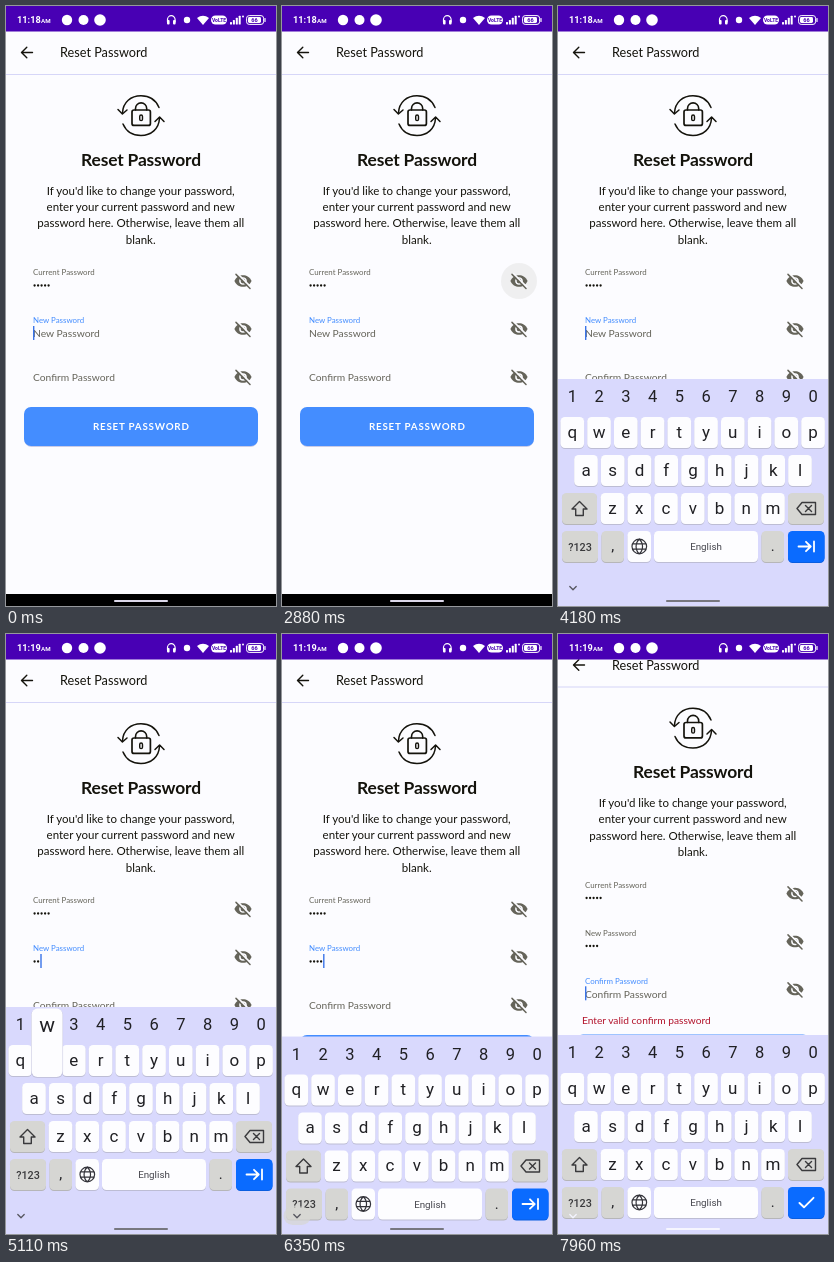
These frames come from a looping animation (270 px wide and 600 px high, 7.99 s). An HTML page:

```html
<!DOCTYPE html>
<html lang="en">
<head>
<meta charset="utf-8">
<title>Reset password</title>
<style>
html, body { margin: 0; width: 100%; height: 100%; overflow: hidden; background: #fcfcff; }
svg { display: block; width: 270px; height: 600px; font-family: Lato, sans-serif; }
.ui { font-family: Roboto, sans-serif; }
.mid { text-anchor: middle; }
.line { fill: none; stroke-linecap: round; stroke-linejoin: round; }
</style>
</head>
<body>
<svg id="stage" viewBox="0 0 270 600" xmlns="http://www.w3.org/2000/svg"></svg>
<script>
const LOOP = 7990, INK = '#14130c', GREY = '#65645a', BLUE = '#448dff', SOFT = '#d6d6d3';
const PAGE = '#fcfcff', BOARD = '#d9d9fd';
const stage = document.getElementById('stage');

function add(parent, tag, attrs, text) {
  const el = document.createElementNS('http://www.w3.org/2000/svg', tag);
  for (const k in attrs) el.setAttribute(k, attrs[k]);
  if (text != null) el.textContent = text;
  parent.appendChild(el);
  return el;
}
const group = (p, attrs = {}) => add(p, 'g', attrs);
const rect = (p, x, y, width, height, fill, rx = 0) => add(p, 'rect', { x, y, width, height, fill, rx });
const circle = (p, cx, cy, r, fill) => add(p, 'circle', { cx, cy, r, fill });
const label = (p, x, y, size, fill, text, more = {}) =>
  add(p, 'text', { x, y, 'font-size': size, fill, ...more }, text);
const stroke = (p, d, color, width = 1.3) =>
  add(p, 'path', { d, class: 'line', stroke: color, 'stroke-width': width });
const show = (el, on) => el.setAttribute('opacity', +on);
const move = (el, y) => el.setAttribute('transform', `translate(0 ${y.toFixed(2)})`);
const MID = { class: 'mid' };

// Page
rect(stage, 0, 0, 270, 600, PAGE);
const page = group(stage);
rect(page, 0, 68, 270, 1, '#d6d6f8');
stroke(page, 'M26.5 46.5H15.8M20.8 41.3L15.5 46.5L20.8 51.7', INK, 1.4);
label(page, 54, 51, 12.7, INK, 'Reset Password');

stroke(page, 'M116.5 107C117 96 125 89.8 135 89.8C143.5 89.8 150 94.5 153 101.5', INK, 1.5);
stroke(page, 'M153.5 112C153 123 145 129.5 135 129.5C126.5 129.5 120 125 117 118', INK, 1.5);
stroke(page, 'M112 103.5L116.4 108L121 104M149 115.5L153.6 111L158 115.5', INK, 1.5);
stroke(page, 'M129.5 104V102.5A5.6 5.6 0 0 1 140.7 102.5V104', INK, 1.6);
add(page, 'rect', { x: 126, y: 104, width: 18.4, height: 15.4, rx: 2, fill: 'none', stroke: INK, 'stroke-width': 1.7 });
add(page, 'rect', { x: 133.7, y: 109, width: 2.8, height: 5.6, rx: 1.4, fill: 'none', stroke: INK, 'stroke-width': 1.4 });

label(page, 135, 159.5, 17.4, INK, 'Reset Password', { class: 'mid', 'font-weight': 700, 'letter-spacing': -0.15 });
["If you'd like to change your password,", 'enter your current password and new',
 'password here. Otherwise, leave them all', 'blank.'
].forEach((s, i) => label(page, 134.7, 188.5 + 16.4 * i, 11.5, INK, s, MID));

const ripple = circle(page, 237, 275, 18, SOFT);
function eye(y, bg) {
  const g = group(page, { transform: `translate(237 ${y}) scale(.78)` });
  add(g, 'path', { d: 'M-11 0C-7-10 7-10 11 0C7 10-7 10-11 0Z', fill: GREY });
  circle(g, 0, 0, 4.9, bg);
  circle(g, 0, 0, 3, GREY);
  const slash = group(g);
  stroke(slash, 'M-7.5-9.8L10.5 8.2', PAGE, 2.4).style.strokeLinecap = 'butt';
  stroke(slash, 'M-9-8.5L9 9.5', GREY, 1.9);
  return slash;
}
const slash = eye(275, 'none');
eye(323, PAGE);
eye(371, PAGE);
const iris = add(slash.parentNode, 'circle', { r: 4, fill: 'none', stroke: PAGE, 'stroke-width': 1.9 });
slash.parentNode.appendChild(slash);

function dots(y, n) {
  const list = [];
  for (let i = 0; i < n; i++) list.push(circle(page, 28.6 + 3.5 * i, y, 1.15, INK));
  return list;
}
label(page, 27, 269.3, 7.9, GREY, 'Current Password');
const oldDots = dots(279.5, 5);
const plain = label(page, 27, 283.3, 9.8, '#4a483c', '12345');

const newLabel = label(page, 27, 317.2, 7.9, BLUE, 'New Password');
const newHint = label(page, 27, 331, 10.3, GREY, 'New Password');
const newDots = dots(327.5, 4);

const okLabel = label(page, 27, 365, 7.9, BLUE, 'Confirm Password');
const okHint = label(page, 27, 374.8, 10.25, GREY, 'Confirm Password');
const cursor = rect(page, 27, 320, 1.4, 14, '#3a74e8');

const error = label(page, 24, 405.8, 10.2, '#b3142c', 'Enter valid confirm password');
const button = group(page);
rect(button, 18.5, 402.5, 233, 38.6, '#c9cbe6', 7);
rect(button, 18, 401, 234, 39, BLUE, 7);
const clip = add(add(stage, 'defs'), 'clipPath', { id: 'btn' });
rect(clip, 18, 401, 234, 39, '#000', 7);
const splash = add(button, 'circle', { cx: 135, cy: 420, r: 10, fill: '#fff', 'clip-path': 'url(#btn)' });
label(button, 135.3, 424, 9.8, '#fff', 'RESET PASSWORD', { class: 'mid', 'font-weight': 700, 'letter-spacing': 0.78 });

// Status bar
const bar = group(stage, { class: 'ui' });
rect(bar, 0, 0, 270, 25.5, '#4800b4');
const clock = label(bar, 11, 17.4, 9.2, '#fff', '11:18', { 'font-weight': 700 });
label(bar, 35, 17.4, 6.2, '#fff', 'AM', { 'font-weight': 700 });
circle(bar, 61, 14, 5.2, '#fff');
circle(bar, 77.5, 14, 5, '#fff');
circle(bar, 94, 14, 5.8, '#fff');
stroke(bar, 'M161.5 16V13.5A3.8 3.8 0 0 1 169.1 13.5V16', '#fff', 1.2);
rect(bar, 161, 14, 2.6, 4.6, '#fff', 1);
rect(bar, 167, 14, 2.6, 4.6, '#fff', 1);
circle(bar, 181, 14, 3.2, '#fff');
add(bar, 'path', { d: 'M191 12Q197 7.5 203 12L197 19Z', fill: '#fff' });
rect(bar, 205, 9.5, 16, 9, '#fff', 4.5);
label(bar, 213, 16, 5, '#4800b4', 'VoLTE', { class: 'mid', 'font-weight': 700 });
for (let i = 0; i < 4; i++) rect(bar, 224 + 2.9 * i, 16 - 2.1 * i, 2, 2.6 + 2.1 * i, '#fff', 0.5);
circle(bar, 237, 10.5, 1, '#fff');
add(bar, 'rect', { x: 240.6, y: 9.6, width: 17, height: 8.8, rx: 2.6, fill: 'none', stroke: '#fff', 'stroke-width': 1 });
rect(bar, 242, 11, 13, 6, '#fff', 1.4);
label(bar, 248.5, 16.2, 5.6, '#4800b4', '66', { class: 'mid', 'font-weight': 700 });
rect(bar, 258.4, 12, 1.2, 4, '#fff', 0.6);

rect(stage, 0, 588, 270, 12, '#000');

// Keyboard, laid out from its own top edge
const board = group(stage, { class: 'ui' });
rect(board, 0, 0, 270, 240, BOARD);
function key(x, y, w, fill = '#fdfdff', edge = '#bdbdd4') {
  rect(board, x, y + 1, w, 31, edge, 4.5);
  rect(board, x, y, w, 31, fill, 4.5);
}
const glyph = (x, y, s, size = 17) => label(board, x, y, size, '#202024', s, MID);
const col = i => 14.3 + 26.75 * i;
[...'1234567890'].forEach((s, i) => glyph(col(i), 23.3, s, 16.5));
function row(letters, x, y) {
  [...letters].forEach((s, i) => {
    key(x + 26.75 * i - 11.8, y, 23.6);
    glyph(x + 26.75 * i, y + 20.5, s);
  });
}
row('qwertyuiop', col(0), 38);
row('asdfghjkl', 28, 76);
row('zxcvbnm', 54.5, 114);
const dim = (x, y, w) => key(x, y, w, SOFT, '#b6b6b8');
dim(4, 114, 35);
dim(230, 114, 36);
dim(4, 152, 36);
dim(43.5, 152, 22.5);
key(69.5, 152, 23.5);
key(96, 152, 104);
dim(203.5, 152, 22.5);
key(230, 152, 36.5, '#0a6bff', '#0a5ee0');
stroke(board, 'M21.5 122.5L29 130H25.3V136.5H17.7V130H14Z', '#3a3a3c', 1.4);
stroke(board, 'M244 123.5H257.5V135.5H244L239 129.5ZM247.5 126.5L253.5 132.5M253.5 126.5L247.5 132.5', '#3a3a3c', 1.4);
label(board, 22, 171.6, 10.8, '#3a3a3c', '?123', { class: 'mid', 'font-weight': 500 });
glyph(54.8, 172, ',', 15);
glyph(214.8, 172, '.', 15);
label(board, 148, 171, 9.8, '#44444c', 'English', MID);
stroke(board, 'M74 167.5A7.3 7.3 0 1 0 88.6 167.5A7.3 7.3 0 1 0 74 167.5M75 164.8H87.6M75 170.2H87.6M81.3 160.2C77 164 77 171 81.3 174.8C85.6 171 85.6 164 81.3 160.2', '#33333a', 1.2);
const tab = stroke(board, 'M240.5 167.5H252.5M248 162.8L252.7 167.5L248 172.2M256 162.5V172.5', '#fff', 1.8);
const tick = stroke(board, 'M241.5 168L246 172.3L255.5 162.8', '#fff', 1.9);

const popup = group(board);
rect(popup, -16, 2, 32, 69, '#c3c3de', 6);
rect(popup, -15.5, 1.5, 31, 68.5, '#fdfdff', 6);
const popText = label(popup, 0, 25, 21, '#202024', '', MID);

const foot = group(stage);
const press = rect(foot, 1.5, 572.5, 27.5, 18.5, SOFT, 9.2);
const chevron = stroke(foot, 'M11.8 580.5L15 583.7L18.2 580.5', '#55555e', 1.3);
const pill = rect(stage, 108, 594, 54, 1.9, '#fff', 0.9);

// Timing
const clamp = v => Math.min(1, Math.max(0, v));
const span = (t, a, b) => clamp((t - a) / (b - a));
const out = v => 1 - (1 - v) ** 3;
const inOut = v => v * v * (3 - 2 * v);
const KEYS = [[4790, 'q', 0], [5060, 'w', 1], [5330, 'e', 2], [5590, 'r', 3]];
const CURSOR = [[0, 1], [440, 0], [930, 1], [1420, 0], [1920, 1], [2420, 0], [2920, 1], [3420, 0],
  [3920, 1], [4420, 0], [4790, 1], [6390, 0], [6890, 1], [7390, 0], [7770, 1]];

function boardTop(t) {
  if (t < 3230) return 600;
  if (t < 6160) return 600 - 199 * out(span(t, 3230, 3295)) - 28 * inOut(span(t, 3480, 3620));
  if (t < 7770) return 373 + 227 * inOut(span(t, 6290, 6560));
  return 600 - 199 * out(span(t, 7790, 7940));
}

function tap(t, start) {
  const grow = out(span(t, start, start + 150));
  return { grow, alpha: span(t, start, start + 60) * (1 - span(t, start + 210, start + 350)) };
}

function draw(t) {
  const toConfirm = t >= 7770;
  const eyeTap = tap(t, t < 2400 ? 1780 : 2580);
  ripple.setAttribute('r', 8 + 10 * eyeTap.grow);
  show(ripple, eyeTap.alpha);
  const seen = t >= 1900 && t < 2700;
  show(slash, !seen);
  show(plain, seen);
  iris.setAttribute('stroke', eyeTap.alpha > 0.4 ? SOFT : PAGE);
  oldDots.forEach(d => show(d, !seen));

  const typed = KEYS.filter(k => t >= k[0]).length;
  newDots.forEach((d, i) => show(d, i < typed));
  show(newHint, !typed);
  newLabel.setAttribute('fill', toConfirm ? GREY : BLUE);

  const lift = toConfirm ? out(span(t, 7770, 7900)) : 0;
  show(okLabel, lift);
  okHint.setAttribute('y', 374.8 + 4.4 * lift);
  cursor.setAttribute('x', !toConfirm && typed ? 27.5 + 3.4 * typed : 27);
  cursor.setAttribute('y', toConfirm ? 367.8 : 320);
  show(cursor, CURSOR.filter(c => t >= c[0]).pop()[1]);

  const failed = t >= 6970;
  show(error, failed);
  move(button, failed ? 15 : 0);
  splash.setAttribute('r', 10 + 120 * span(t, 6800, 7020));
  show(splash, t < 6800 ? 0 : 0.14 * (1 - span(t, 6880, 7100)));
  move(page, toConfirm ? -15.5 * inOut(span(t, 7830, 7955)) : 0);

  clock.textContent = t < 5000 ? '11:18' : '11:19';
  const top = boardTop(t);
  move(board, top);
  show(tab, !toConfirm);
  show(tick, toConfirm);
  const hitKey = KEYS.find(k => t >= k[0] && t < k[0] + 90);
  show(popup, !!hitKey);
  if (hitKey) {
    popText.textContent = hitKey[1];
    popup.setAttribute('transform', `translate(${col(hitKey[2])} 0)`);
  }

  const up = top < 585;
  const dark = up && t >= 4030 && t < 6600;
  show(foot, up);
  show(press, t >= 6160 && t < 6500 ? 1 - span(t, 6300, 6480) : 0);
  chevron.setAttribute('stroke', dark ? '#55555e' : '#f4f4ff');
  pill.setAttribute('fill', dark ? '#77777f' : up ? '#f6f6ff' : '#dcd8ea');
}

function frame() {
  draw(performance.now() % LOOP);
  requestAnimationFrame(frame);
}
frame();
</script>
</body>
</html>
```
